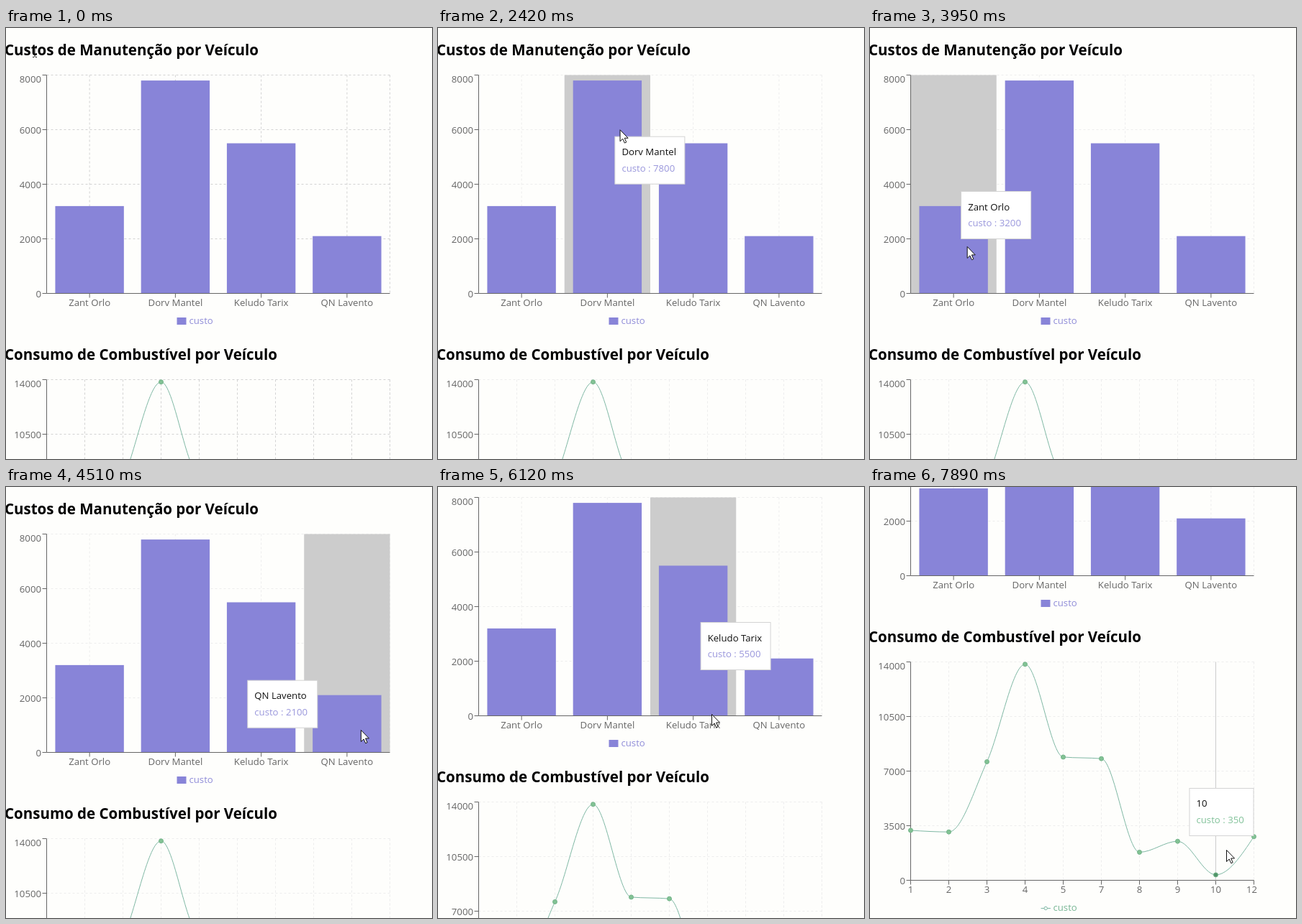
Recreate the animation shown at these times as an HTML page. Size 592 by 600 pixels, loop 8 s.

```html
<!DOCTYPE html>
<html lang="pt">
<head>
<meta charset="utf-8">
<style>
  html, body { margin: 0; width: 100%; height: 100%; overflow: hidden; background: #fefefc; }
  svg { display: block; width: 592px; height: 600px; font: 13.2px "Open Sans", "Noto Sans", sans-serif; }
  .title { font-size: 20.5px; font-weight: 700; fill: #000; }
  .axis { stroke: #666; fill: none; }
  .label { fill: #666; }
  .grid { stroke: var(--grid); stroke-dasharray: 3 3; }
  .bar { fill: #8884d8; }
  .curve { fill: none; stroke: #7fb8a4; }
  .dot { fill: #82c294; stroke: #74b48a; }
  .band { fill: #ccc; }
</style>
</head>
<body>
<svg id="stage" viewBox="0 0 592 600"></svg>
<script>
const NS = "http://www.w3.org/2000/svg";
const LOOP = 8000, LEFT = 56.5, WIDTH = 477, HEIGHT = 304, RIGHT = LEFT + WIDTH;
const BAR_TOP = 65.5, LINE_TOP = 489.5, BAND = WIDTH / 4, STEP = WIDTH / 9;
const TIP_HEIGHT = 67, TIP_GAP = 10, TIP_GLIDE = 400, HOVER_LAG = 60;
const cars = [["Zant Orlo", 3200], ["Dorv Mantel", 7800], ["Keludo Tarix", 5500], ["QN Lavento", 2100]];
const costs = [[1, 3200], [2, 3100], [3, 7600], [4, 13850], [5, 7900], [7, 7800], [8, 1800], [9, 2500], [10, 350], [12, 2800]];

// Pointer stops: time, x, y
const stops = [[0, 40, 33], [560, 40, 33], [950, 12, 38], [1290, 96, 48], [1450, 257, 60], [1540, 257, 62],
  [1850, 250, 140], [2750, 254, 142], [3140, 146, 304], [3950, 134, 304], [4230, 320, 276], [4510, 493, 338],
  [5400, 380, 316], [6150, 380, 316], [6700, 370, 395], [6850, 418, 341], [7250, 480, 400], [7490, 505, 490],
  [7890, 495, 505], [LOOP, 495, 505]];

const clamp = (v, lo, hi) => Math.min(hi, Math.max(lo, v));

function set(node, attrs) {
  for (const key in attrs) node.setAttribute(key, attrs[key]);
}
function add(parent, tag, attrs = {}, text) {
  const node = document.createElementNS(NS, tag);
  set(node, attrs);
  if (text !== undefined) node.textContent = text;
  return parent.appendChild(node);
}
const line = (parent, cls, x1, y1, x2, y2) => add(parent, "line", { class: cls, x1, y1, x2, y2 });
const label = (parent, x, y, text, anchor = "middle") =>
  add(parent, "text", { class: "label", x, y, "text-anchor": anchor }, text);

// Smooth path that never overshoots its points
function monotonePath(points) {
  const slopes = points.slice(1).map((p, i) => (p[1] - points[i][1]) / STEP);
  const tangents = points.map((p, i) => {
    const a = slopes[i - 1], b = slopes[i];
    if (a === undefined || b === undefined) return null;
    return (Math.sign(a) + Math.sign(b)) * Math.min(Math.abs(a), Math.abs(b), Math.abs(a + b) / 4);
  });
  const last = points.length - 1, h = STEP / 3;
  tangents[0] = (3 * slopes[0] - tangents[1]) / 2;
  tangents[last] = (3 * slopes[last - 1] - tangents[last - 1]) / 2;
  return points.slice(1).reduce((d, [x, y], i) => {
    const [px, py] = points[i];
    return d + `C${px + h},${py + h * tangents[i]} ${x - h},${y - h * tangents[i + 1]} ${x},${y}`;
  }, `M${points[0]}`);
}

const stage = document.getElementById("stage");
const page = add(stage, "g");

function drawFrame(top, title, max, xs) {
  const bottom = top + HEIGHT;
  add(page, "text", { class: "title", x: -2, y: top - 27.5 }, title);
  for (let i = 0; i < 5; i++) {
    const y = bottom - HEIGHT * i / 4;
    if (i) line(page, "grid", LEFT, y, RIGHT, y);
    line(page, "axis", LEFT - 6, y, LEFT, y);
    label(page, 49, y + (i === 4 ? 10 : 5), max * i / 4, "end");
  }
  for (const x of [...xs, RIGHT]) line(page, "grid", x, top, x, bottom);
}
function drawAxes(top, xs, names) {
  const bottom = top + HEIGHT;
  line(page, "axis", LEFT, top, LEFT, bottom);
  line(page, "axis", LEFT, bottom, RIGHT, bottom);
  xs.forEach((x, i) => {
    line(page, "axis", x, bottom, x, bottom + 6);
    label(page, Math.min(x, RIGHT - 3), bottom + 17, names[i]);
  });
}

const barXs = cars.map((car, i) => LEFT + BAND * (i + 0.5));
drawFrame(BAR_TOP, "Custos de Manutenção por Veículo", 8000, barXs);
const band = add(page, "rect", { class: "band", y: BAR_TOP, width: BAND, height: HEIGHT });
cars.forEach(([, cost], i) => {
  const height = HEIGHT * cost / 8000;
  add(page, "rect", { class: "bar", x: barXs[i] - BAND * 0.4, y: BAR_TOP + HEIGHT - height, width: BAND * 0.8, height });
});
drawAxes(BAR_TOP, barXs, cars.map(car => car[0]));
add(page, "rect", { class: "bar", x: 237.5, y: 403, width: 13, height: 10 });
add(page, "text", { x: 254.5, y: 412, fill: "#8f8cd8" }, "custo");

const points = costs.map(([, cost], i) => [LEFT + STEP * i, LINE_TOP + HEIGHT * (1 - cost / 14000)]);
const lineXs = points.map(p => p[0]);
drawFrame(LINE_TOP, "Consumo de Combustível por Veículo", 14000, lineXs);
drawAxes(LINE_TOP, lineXs, costs.map(c => c[0]));
const guide = add(page, "line", { y1: LINE_TOP, y2: LINE_TOP + HEIGHT, stroke: "#ccc" });
add(page, "path", { class: "curve", d: monotonePath(points) });
const dots = points.map(([cx, cy]) => add(page, "circle", { class: "dot", cx, cy, r: 3 }));
line(page, "curve", 237.5, 832.5, 251, 832.5);
add(page, "circle", { class: "curve", cx: 244.2, cy: 832.5, r: 2.2, style: "fill:#fff" });
add(page, "text", { x: 254.5, y: 836, fill: "#78b694" }, "custo");

const tip = add(page, "g");
const tipBox = add(tip, "rect", { x: 0.5, y: 0.5, height: TIP_HEIGHT - 1, fill: "#fff", stroke: "#d4d4d4" });
const tipName = add(tip, "text", { x: 10, y: 26.5, fill: "#111" });
const tipCost = add(tip, "text", { x: 10, y: 49 });

const arrow = add(stage, "path", { d: "M.5.5V16.5L4.2 13 6.8 18.8 9.2 17.7 6.7 12H11.6Z", fill: "#fff", stroke: "#111" });
const beam = add(stage, "path", { d: "M-3-7.5H-1L0-6.5 1-7.5H3M0-6.5V6.5M-3 7.5H-1L0 6.5 1 7.5H3", fill: "none", stroke: "#222" });

function pointerAt(t) {
  const i = Math.max(1, stops.findIndex(stop => stop[0] > t));
  const [t0, x0, y0] = stops[i - 1], [t1, x1, y1] = stops[i];
  const k = clamp((t - t0) / (t1 - t0), 0, 1);
  return [x0 + (x1 - x0) * k, y0 + (y1 - y0) * k];
}

// Five wheel notches
const notchesAt = t => clamp(Math.floor((t - 6120) / 92) + 1, 0, 5);
const scrollAt = t => notchesAt(t) && 51 + 48.75 * (notchesAt(t) - 1);

// What lies under the pointer; nothing while the page scrolls
function hoverAt(t) {
  const s = t - HOVER_LAG, notches = notchesAt(s);
  const [x, screenY] = pointerAt(s), y = screenY + scrollAt(s);
  const top = notches ? LINE_TOP : BAR_TOP;
  const inside = x > LEFT && x < RIGHT && y > top && y < top + HEIGHT;
  const hover = { bar: -1, point: -1, x: 0, y: top };
  if (!inside || notches % 5) return hover;

  if (notches) hover.point = Math.round((x - LEFT) / STEP);
  else hover.bar = Math.floor((x - LEFT) / BAND);
  hover.item = notches ? costs[hover.point] : cars[hover.bar];
  hover.width = hover.item[1] < 1000 ? 90 : 98;
  const center = notches ? lineXs[hover.point] : barXs[hover.bar];
  hover.x = Math.min(center + TIP_GAP, RIGHT - hover.width);
  const fits = y + TIP_GAP + TIP_HEIGHT < top + HEIGHT;
  hover.y = fits ? y + TIP_GAP : y - TIP_GAP - TIP_HEIGHT;
  return hover;
}

// The tooltip glides: its place is the mean of its recent goals
function tipAt(t) {
  const count = 40;
  let x = 0, y = 0;
  for (let i = 0; i < count; i++) {
    const goal = hoverAt(t - TIP_GLIDE * (i + 0.5) / count);
    x += goal.x / count;
    y += goal.y / count;
  }
  return [x, y];
}

const show = (node, on) => node.setAttribute("visibility", on ? "visible" : "hidden");

function render(t) {
  const { bar, point, item, width } = hoverAt(t);
  stage.style.setProperty("--grid", t < 2420 ? "#d2d2d2" : "#ededed");
  page.setAttribute("transform", `translate(0 ${-scrollAt(t)})`);

  show(band, bar >= 0);
  band.setAttribute("x", LEFT + BAND * bar);
  show(guide, point >= 0);
  if (point >= 0) set(guide, { x1: lineXs[point], x2: lineXs[point] });
  dots.forEach((dot, i) => { dot.style.fill = i === point ? "#4f9468" : ""; });

  show(tip, item);
  if (item) {
    tip.setAttribute("transform", `translate(${tipAt(t)})`);
    tipBox.setAttribute("width", width - 1);
    tipName.textContent = item[0];
    tipCost.textContent = `custo : ${item[1]}`;
    tipCost.setAttribute("fill", bar >= 0 ? "#9a97dc" : "#82c29a");
  }

  const [x, y] = pointerAt(t), overTitle = y < 46;
  show(beam, overTitle);
  show(arrow, !overTitle);
  for (const node of [beam, arrow]) set(node, { transform: `translate(${x} ${y})` });
}

const start = performance.now();
function tick() {
  render((performance.now() - start) % LOOP);
  requestAnimationFrame(tick);
}
tick();
</script>
</body>
</html>
```
